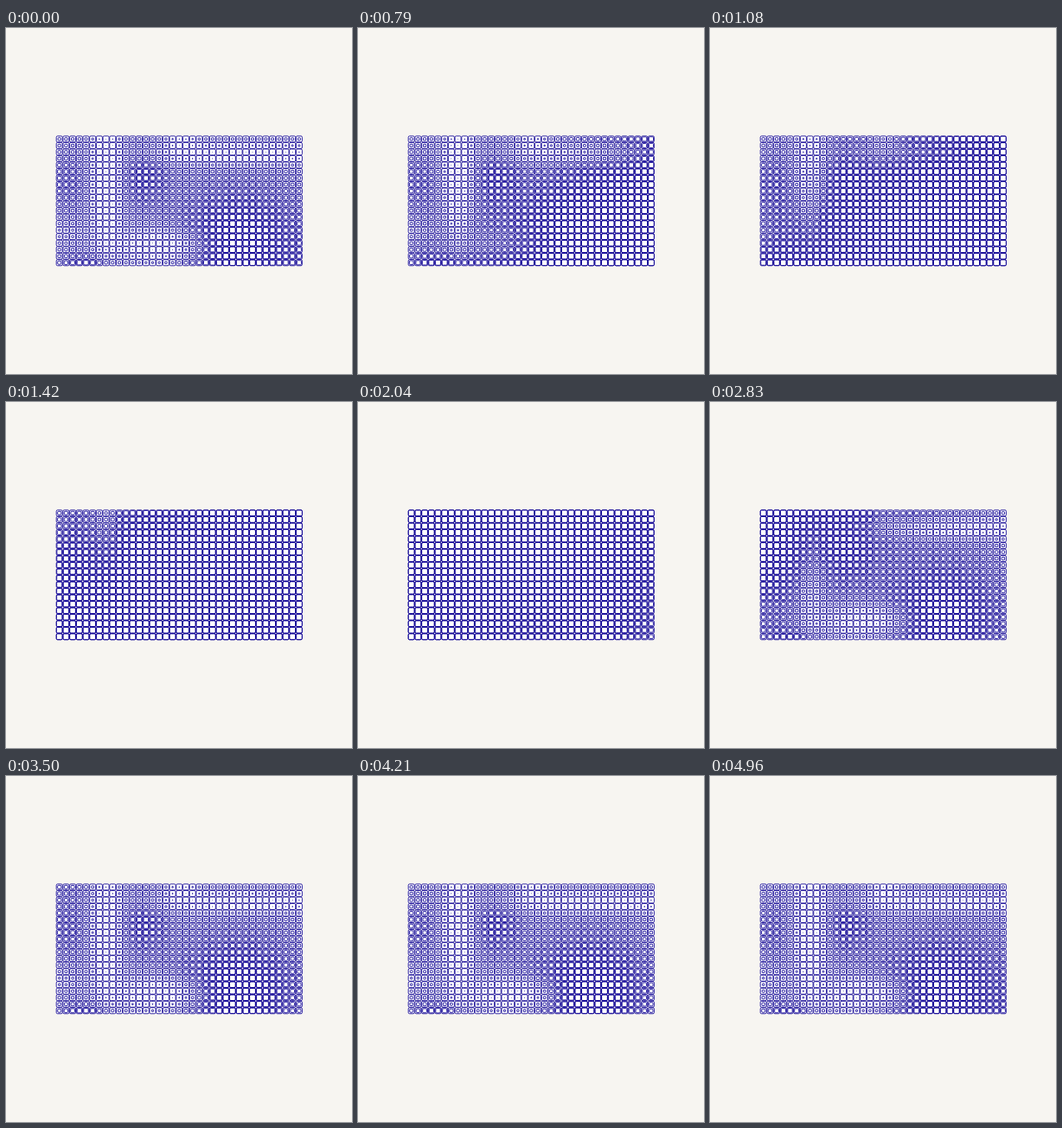
An HTML page with a canvas for the animation above (5000 ms loop, 400 px wide and 400 px high).

```html
<!DOCTYPE html>
<html lang="en">
<head>
<meta charset="utf-8">
<title>Breathing grid</title>
<style>
html, body { margin: 0; width: 100%; height: 100%; overflow: hidden; background: #f7f5f1; }
canvas { display: block; width: 400px; height: 400px; }
</style>
</head>
<body>
<canvas id="stage"></canvas>
<script>
const LOOP = 5000;
const RISE = 1680;
const COLS = 37, ROWS = 20;
const X0 = 61.7, Y0 = 128.4, DX = 7.7, DY = 7.52;
const SIZE = 7;

// Soft hills and hollows that shape the resting size of the inner squares
const LEVEL = 0.45;
const blobs = [
  { x: 116, y: 180, w: 10, h: 50, amp: -0.8 },
  { x: 275, y: 146, w: 70, h: 8, amp: -0.6 },
  { x: 203, y: 130, w: 12, h: 10, amp: -0.35 },
  { x: 180, y: 252, w: 35, h: 13, amp: -0.6 },
  { x: 61, y: 236, w: 20, h: 8, amp: -0.15 },
  { x: 160, y: 172, w: 18, h: 22, amp: 0.32 },
  { x: 68, y: 178, w: 16, h: 20, amp: 0.2 },
  { x: 95, y: 274, w: 22, h: 8, amp: 0.35 },
  { x: 268, y: 250, w: 45, h: 42, amp: 0.55 }
];

const canvas = document.getElementById("stage");
const ctx = canvas.getContext("2d");
const ratio = window.devicePixelRatio || 1;
canvas.width = canvas.height = 400 * ratio;

const clamp = v => Math.min(1, Math.max(0, v));
const easeInOut = k => k < 0.5 ? 4 * k ** 3 : 1 - 4 * (1 - k) ** 3;

function restSize(x, y) {
  let sum = LEVEL;
  for (const b of blobs) {
    const dx = (x - b.x) / b.w, dy = (y - b.y) / b.h;
    sum += b.amp * Math.exp(-(dx * dx + dy * dy) / 2);
  }
  return clamp(sum);
}

// The swell starts at the bottom right corner and runs to the top left
function peakTime(c, r) {
  const u = 1 - c / (COLS - 1), v = 1 - r / (ROWS - 1);
  return 950 + 880 * u + 640 * v;
}

function swell(t, peak) {
  const gap = Math.abs(t - peak);
  return easeInOut(clamp(1 - Math.min(gap, LOOP - gap) / RISE));
}

const cells = [];
for (let r = 0; r < ROWS; r++) {
  for (let c = 0; c < COLS; c++) {
    const x = X0 + c * DX, y = Y0 + r * DY;
    cells.push({ x, y, rest: restSize(x, y), peak: peakTime(c, r) });
  }
}

function square(x, y, s) {
  ctx.roundRect(x - s / 2, y - s / 2, s, s, Math.min(1.4, s * 0.2));
}

function draw(t) {
  ctx.setTransform(ratio, 0, 0, ratio, 0, 0);
  ctx.fillStyle = "#f7f5f1";
  ctx.fillRect(0, 0, 400, 400);
  ctx.fillStyle = "#fff";
  ctx.strokeStyle = "#0e0094";
  ctx.lineWidth = 0.85;

  ctx.beginPath();
  for (const p of cells) square(p.x, p.y, SIZE);
  ctx.fill();
  ctx.stroke();

  ctx.beginPath();
  for (const p of cells) {
    const k = p.rest + (1 - p.rest) * swell(t, p.peak);
    square(p.x, p.y, SIZE * Math.max(0.03, k));
  }
  ctx.stroke();
}

const start = performance.now();
function tick() {
  draw((performance.now() - start) % LOOP);
  requestAnimationFrame(tick);
}
tick();
</script>
</body>
</html>
```
